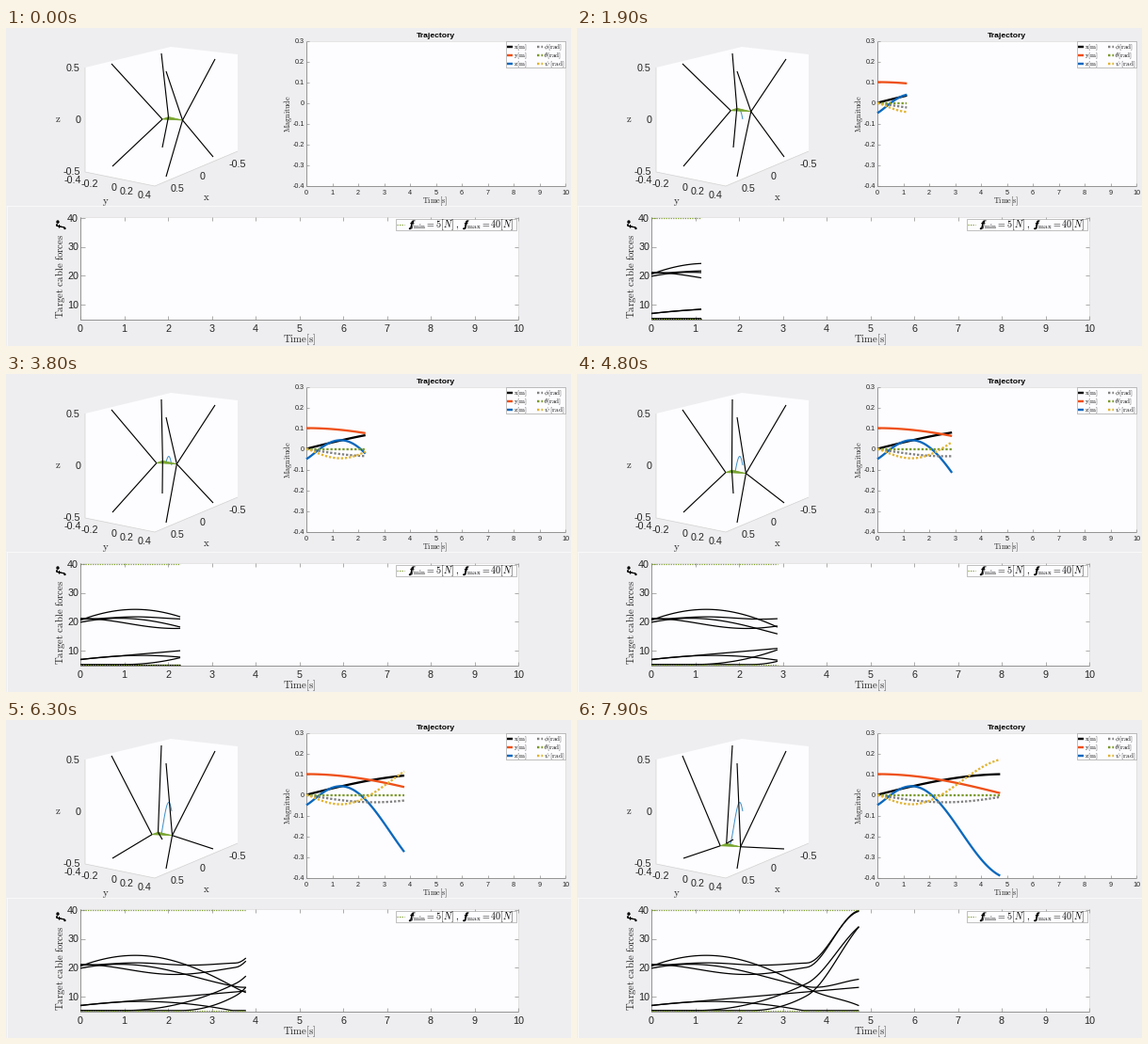
Animation of 600x338 px, one loop 8000 ms. Source, as a matplotlib script:

```python
import numpy as np
import matplotlib.pyplot as plt
from matplotlib.animation import FuncAnimation
from matplotlib.patheffects import withStroke

plt.rcParams["mathtext.fontset"] = "cm"
plt.rcParams["font.family"] = "Liberation Sans"

W, H, DPI = 600, 338, 100
FRAMES, STEP = 80, 0.06
PT = 72 / DPI
F_MIN, F_MAX = 5, 40

PANEL, WHITE = "#eeedef", "#fdfcfe"
INK, GREY = "#262626", "#8c8c8c"
BLUE, ORANGE, SMOKE, OLIVE, GOLD = "#0a68bd", "#ee5018", "#808080", "#7a9a2a", "#e0b432"
DOTS, FINE = (0, (1, 0.85)), (0, (1, 1.1))

# Motion of the platform: a slow arc in x and y, a swing in z
t = np.arange(FRAMES) * STEP
x = 0.1 * np.sin(np.pi * t / 10)
y = 0.1 * np.cos(np.pi * t / 10)
lift = 0.091 - 0.445 * np.sin(0.41 * (t - 1.33)) ** 2 + 0.029 * np.exp(-3 * t)
z = lift - 0.05
phi = -0.036 * np.sin(0.6 * t)
theta = 0 * t
psi = -0.5 * lift


# Cable forces: slow waves and ramps, then a late surge
def wave(top, drop, rate, peak):
    return top - drop * np.sin(rate * (t - peak)) ** 2


def ramp(start, gain):
    return F_MIN + gain * np.maximum(t - start, 0) ** 2


u = np.clip((t - 3.55) / 1.25, 0, 1)
surge = u * u * (3 - 2 * u)
forces = np.clip([
    wave(24.2, 28, 0.3, 1.25) + 3.5 * surge,
    21.2 - 0.4 * np.cos(2.5 * t) + 18.8 * surge,
    19.3 + 1.75 * np.cos(1.45 * t) + 19.2 * surge,
    wave(21.1, 9, 0.45, 0.9) + 3.6 * surge,
    6.8 + 1.32 * t,
    wave(8.15, 32, 0.155, 1.4),
    ramp(1, 1.45) + 9 * surge,
    ramp(2.3, 3.3) + 9.6 * surge,
], F_MIN, F_MAX)

# Screen shift of the platform in the 3D view
shift = np.column_stack([-63 * x + 82 * (y - 0.1),
                         -108 * lift + 15 * x + 17 * (y - 0.1)])

fig = plt.figure(figsize=(W / DPI, H / DPI), dpi=DPI, facecolor=PANEL)
ax = fig.add_axes([0, 0, 1, 1])
ax.set(xlim=(0, W), ylim=(H, 0))
ax.axis("off")


def line(xs, ys, color="k", lw=1.0, **kw):
    kw.setdefault("solid_capstyle", "butt")
    return ax.plot(xs, ys, color=color, lw=lw * PT, **kw)[0]


def label(px, py, s, size, ha="center", va="baseline", color=INK, **kw):
    return ax.text(px, py, s, fontsize=size * PT, ha=ha, va=va, color=color, **kw)


def tex(px, py, s, size, **kw):
    return label(px, py, rf"$\mathrm{{{s}}}$", size, **kw)


def bold(px, py, s, size, **kw):
    label(px, py, f"${s}$", size, ha="left", color="k",
          path_effects=[withStroke(linewidth=0.55 * PT, foreground="k")], **kw)


def box(x0, y0, x1, y1, edge="none", **kw):
    ax.fill([x0, x1, x1, x0], [y0, y0, y1, y1], fc=WHITE, ec=edge, lw=0.6 * PT, **kw)


def frame(x0, y0, x1, y1):
    box(x0, y0, x1, y1)
    line([x0, x1, x1], [y0, y0, y1], "#dcdcdc", 0.7)
    line([x0, x0, x1], [y0, y1, y1], GREY, 0.9)


line([0, W], [188.5, 188.5], "#f8f8f9", 1)
line([0.5, 0.5], [189, H], "#f8f8f9", 1)

# 3D view
ax.fill([84, 175, 246, 246, 158, 84], [42, 20, 28, 131, 168, 153], fc=WHITE, ec="none")
line([84, 84, 158, 246], [42, 153, 168, 131], "#d2d2d2", 0.7)
for k in range(3):
    v = f"{0.5 - 0.5 * k:g}"
    label(79, 46 + 55 * k, v, 10.8, ha="right")
    label(175 + 31 * k, 174 - 13 * k, v, 10.8, ha="left")
for k in range(5):
    label(80 + 18.5 * k, 165 + 4 * k, f"{(k - 2) / 5:g}", 10.8, ha="right")
tex(55, 100, "z", 10.8)
tex(106, 187, "y", 10.8)
tex(213, 183, "x", 10.8)


# Trajectory chart
def tx(v):
    return 319 + 27.5 * np.asarray(v)


def ty(v):
    return 79.5 - 220 * np.asarray(v)


frame(319, 13.5, 594, 167.5)
for k in range(11):
    line([tx(k)] * 2, [167.5, 165], GREY, 0.7)
    label(tx(k), 177.2, str(k), 7.3)
for k in range(-4, 4):
    line([319, 321.5], [ty(k / 10)] * 2, GREY, 0.7)
    label(317, ty(k / 10) + 2.7, f"{k / 10:g}", 7.3, ha="right")
label(456.5, 10.5, "Trajectory", 8.5, weight="bold", color="k")
tex(456, 186, "Time[s]", 8.1)
tex(299, 91, "Magnitude", 8.1, va="center", rotation=90)

signals = [(x, "x[m]", "k", "-"), (y, "y[m]", ORANGE, "-"), (z, "z[m]", BLUE, "-"),
           (phi, r"\phi[rad]", SMOKE, DOTS), (theta, r"\theta[rad]", OLIVE, DOTS),
           (psi, r"\psi\ [rad]", GOLD, DOTS)]
box(530.5, 14, 594, 42, edge="#999999", zorder=5)
for i, (_, name, color, style) in enumerate(signals):
    px, py = 531.5 + 32 * (i // 3), 20 + 9.2 * (i % 3)
    line([px, px + 6.8], [py, py], color, 2.4, ls=style, zorder=6)
    tex(px + 7.2, py + 2.2, name, 7.2, ha="left", color="k", zorder=6)


# Force chart
def fx(v):
    return 79 + 46.5 * np.asarray(v)


def fy(v):
    return 324 - 3.05 * np.asarray(v)


frame(79, 200.5, 544, 310)
for k in range(11):
    line([fx(k)] * 2, [310, 305.5], GREY, 0.7)
    line([fx(k)] * 2, [200.5, 205], GREY, 0.7)
    label(fx(k), 323, str(k), 10.8)
for k in range(10, 50, 10):
    line([79, 83.5], [fy(k)] * 2, GREY, 0.7)
    line([539.5, 544], [fy(k)] * 2, GREY, 0.7)
    label(77, fy(k) + 4, str(k), 10.8, ha="right")
tex(311.5, 334.5, "Time[s]", 10.8)
upright = dict(rotation=90, rotation_mode="anchor")
tex(61, 309, r"Target\ cable\ forces", 10.8, ha="left", **upright)
bold(61, 214.5, r"f^{\ast}", 10.8, **upright)

box(413.5, 202.5, 541.5, 215, edge="#999999", zorder=5)
line([415, 423], [209, 209], OLIVE, 1.2, ls=FINE, zorder=6)
for px, sub, value in [(427.5, "min", rf"{F_MIN}[N]\ ,"), (485, "max", f"{F_MAX}[N]")]:
    label(px, 212, rf"$f_{{\mathrm{{{sub}}}}} = {value}$", 10, ha="left",
          color="k", zorder=6)
    bold(px, 212, "f", 10, zorder=7)

# Moving parts: each platform joint and the wall anchors it hangs from
joints = np.array([(166, 97), (172.5, 94.5), (187.5, 98)])
anchors = [[(112, 38), (113, 147)],
           [(165, 27), (166, 127)],
           [(170, 46), (170, 158), (222, 33), (220, 137)]]

trail = line([], [], "#3f8fc6", 1.0, zorder=3)
plate = ax.fill(*joints.T, fc="#77a42c", ec="#77a42c", lw=0.8 * PT, zorder=3)[0]
cables = [(line([], [], "k", 1.15, zorder=4), j, p)
          for j, group in enumerate(anchors) for p in group]

curves = [(line([], [], c, 2.3, ls=s, dash_capstyle="butt"), tx(t), ty(v))
          for v, _, c, s in signals]
curves += [(line([], [], "k", 1.25), fx(t), fy(f)) for f in forces]
curves += [(line([], [], OLIVE, 1.2, ls=FINE), fx(t), fy(0 * t + lim))
           for lim in (F_MIN, F_MAX)]


def update(n):
    stop = n + 1 if n else 0
    for ln, xs, ys in curves:
        ln.set_data(xs[:stop], ys[:stop])
    trail.set_data(176 + shift[:stop, 0], 97 + shift[:stop, 1])
    pts = joints + shift[n]
    plate.set_xy(pts)
    for ln, j, p in cables:
        ln.set_data(*zip(p, pts[j]))
    return [plate, trail, *(c[0] for c in cables + curves)]


anim = FuncAnimation(fig, update, frames=FRAMES, interval=100,
                     repeat=True, repeat_delay=0)
plt.show()
```
